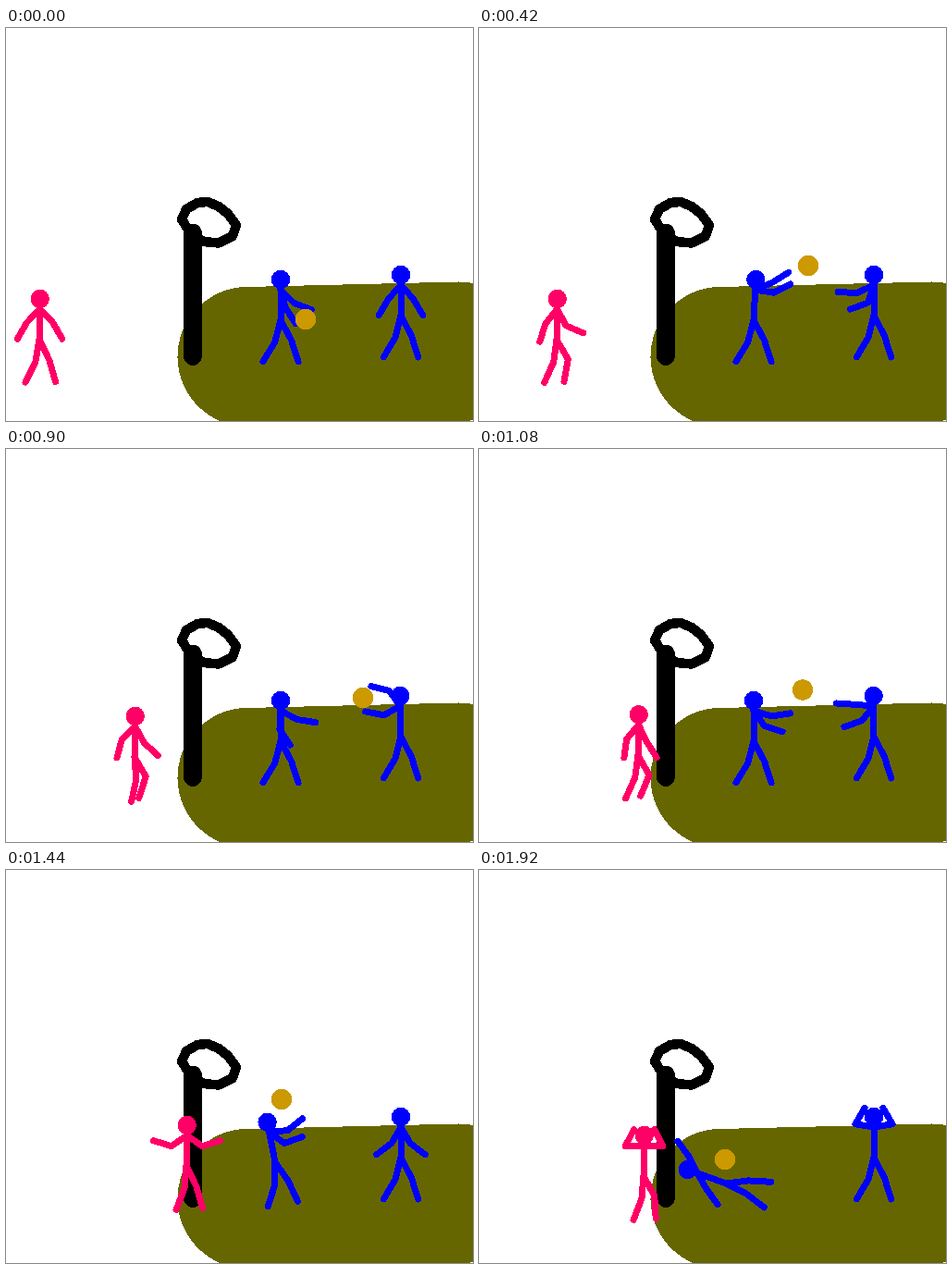
An HTML page for the animation above (2400 ms loop, 505x425 px).

```html
<!DOCTYPE html>
<html lang="en">
<head>
<meta charset="utf-8">
<title>Ball game</title>
<style>
  html, body { margin: 0; width: 100%; height: 100%; overflow: hidden; background: #fff; }
  svg { display: block; width: 505px; height: 425px; }
  path { fill: none; stroke-linecap: round; stroke-linejoin: round; }
</style>
</head>
<body>
<svg id="stage" viewBox="0 0 505 425" shape-rendering="crispEdges">
  <path d="M261 355.500L490 350" stroke="#660" stroke-width="151"/>
  <path d="M202 221.500V355" stroke="#000" stroke-width="20"/>
  <path d="M190 207L195 196L207 189L218 188L230 193L240 201L249 213L245 225L230 232.500L213 231L197 218Z" stroke="#000" stroke-width="10.500"/>
</svg>
<script>
const LOOP = 2400, STEP = 60, LAST = 1920;
const ARM = 20.3, LEG = 24.5, NECK = 33, HEAD = 44;
const BEATS = [0, 420, 600, 900, 1200, 1440, LAST];
const RAD = Math.PI / 180;
const stage = document.getElementById('stage');

function add(tag, attrs) {
  const el = document.createElementNS('http://www.w3.org/2000/svg', tag);
  for (const name in attrs) el.setAttribute(name, attrs[name]);
  return stage.appendChild(el);
}

// Angles are in degrees from straight down, positive to the right.
const polar = ([x, y], angle, length) =>
  [x + length * Math.sin(angle * RAD), y + length * Math.cos(angle * RAD)];
const mirrored = (...angles) => [...angles.map(a => -a), ...angles];
const still = row => BEATS.map(() => row);

// One row per beat. Arms: upper and lower angle of each arm; legs: one angle each.
// stride: how far the legs swap over between two beats.
const walker = {
  color: '#ff0066',
  end: LAST,
  hip: [[36, 337], [84, 337], [104, 337], [139, 333], [194, 330], [195, 320], [178, 331]],
  lean: still([1]),
  arms: [
    mirrored(44, 30), [-39, -17, 28, 67], [-9, 37, 14, 51], [-45, -15, 29, 47],
    [-36, -3, 23, 23], mirrored(55, 107), mirrored(88, 207)
  ],
  legs: [[-18, 21], [-16, 10], [-19, 3], [-4, 6], [-24, 2], [-13, 21], [-13, 16]],
  stride: [26, 0, 26, 0, 0, 0]
};

const keeper = {
  color: '#0000ff',
  end: LAST,
  hip: [...still([297, 316]).slice(2), [291, 316], [267, 339]],
  lean: [[0], [3], [3], [0], [0], [-11], [-70]],
  arms: [
    [45, 69, 15, 33], [113, 122, 81, 117], [49, 53, 21, 35], [62, 81, -3, 34],
    [80, 111, 61, 98], [96, 129, 54, 110], [207, 216, 30, 36]
  ],
  legs: [...still(mirrored(23)).slice(2), [-9, 30], [58, 92]]
};

const catcher = {
  color: '#0000ff',
  end: 1620,
  hip: still([427, 311]),
  lean: [[0], [0], [-3.5], [-1], [0], [0], [0]],
  arms: [
    mirrored(42, 30), [-65, -93, -19, -70], [-111, -107, -80, -107], [-144, -104, -61, -101],
    [-62, -87, -24, -50], mirrored(30, 53), mirrored(99, 210)
  ],
  legs: still(mirrored(22.5))
};

// lift: height of the arc between two beats.
const toss = {
  at: [[324, 315], [356, 257], [374, 260], [386, 269], [326, 266], [298, 248], [266, 313]],
  lift: [10, 0, 0, 7, 12, 20]
};

const figures = [catcher, keeper, walker];
for (const figure of figures) {
  figure.limbs = add('path', { stroke: figure.color, 'stroke-width': 7 });
  figure.dot = add('circle', { r: 10.2, fill: figure.color });
}
const ball = add('circle', { r: 11.2, fill: '#cc9900' });

// Finds the beat i and the share k of the way to the next one.
function locate(t, end) {
  const times = [...BEATS.slice(0, -1), end];
  const i = Math.min(times.filter(time => time <= t).length, BEATS.length - 1) - 1;
  return { i, k: Math.min((t - times[i]) / (times[i + 1] - times[i]), 1) };
}

const blend = (rows, { i, k }) => rows[i].map((v, n) => v + (rows[i + 1][n] - v) * k);

function place(circle, [x, y]) {
  circle.setAttribute('cx', x);
  circle.setAttribute('cy', y);
}

const line = points => 'M' + points.map(p => p.join(' ')).join('L');

function arm(shoulder, upper, lower) {
  const elbow = polar(shoulder, upper, ARM);
  return line([shoulder, elbow, polar(elbow, lower, ARM)]);
}

// A leg folds as it comes forward under the hip and stays long behind it.
function leg(hip, angle) {
  const reach = angle < 0 ? 48.5 : Math.min(48.8, 43 + 0.3 * angle);
  const fold = Math.acos(reach / 2 / LEG) / RAD;
  return line([hip, polar(hip, angle + fold, LEG), polar(hip, angle, reach)]);
}

function pose(figure, t) {
  const at = locate(t, figure.end);
  const hip = blend(figure.hip, at);
  const up = 180 - blend(figure.lean, at)[0];
  const neck = polar(hip, up, NECK), head = polar(hip, up, HEAD);
  const [au, al, bu, bl] = blend(figure.arms, at);
  const [la, lb] = blend(figure.legs, at);
  const swing = figure.stride ? figure.stride[at.i] * Math.sin(Math.PI * at.k) : 0;
  figure.limbs.setAttribute('d', line([head, hip]) +
    arm(neck, au, al) + arm(neck, bu, bl) + leg(hip, la + swing) + leg(hip, lb - swing));
  place(figure.dot, head);
}

function draw(now) {
  const t = Math.min(Math.floor(now % LOOP / STEP) * STEP, LAST);
  figures.forEach(figure => pose(figure, t));
  const at = locate(t, LAST);
  const [x, y] = blend(toss.at, at);
  place(ball, [x, y - 4 * toss.lift[at.i] * at.k * (1 - at.k)]);
}

function tick() {
  draw(performance.now());
  requestAnimationFrame(tick);
}
draw(0);
requestAnimationFrame(tick);
</script>
</body>
</html>
```
